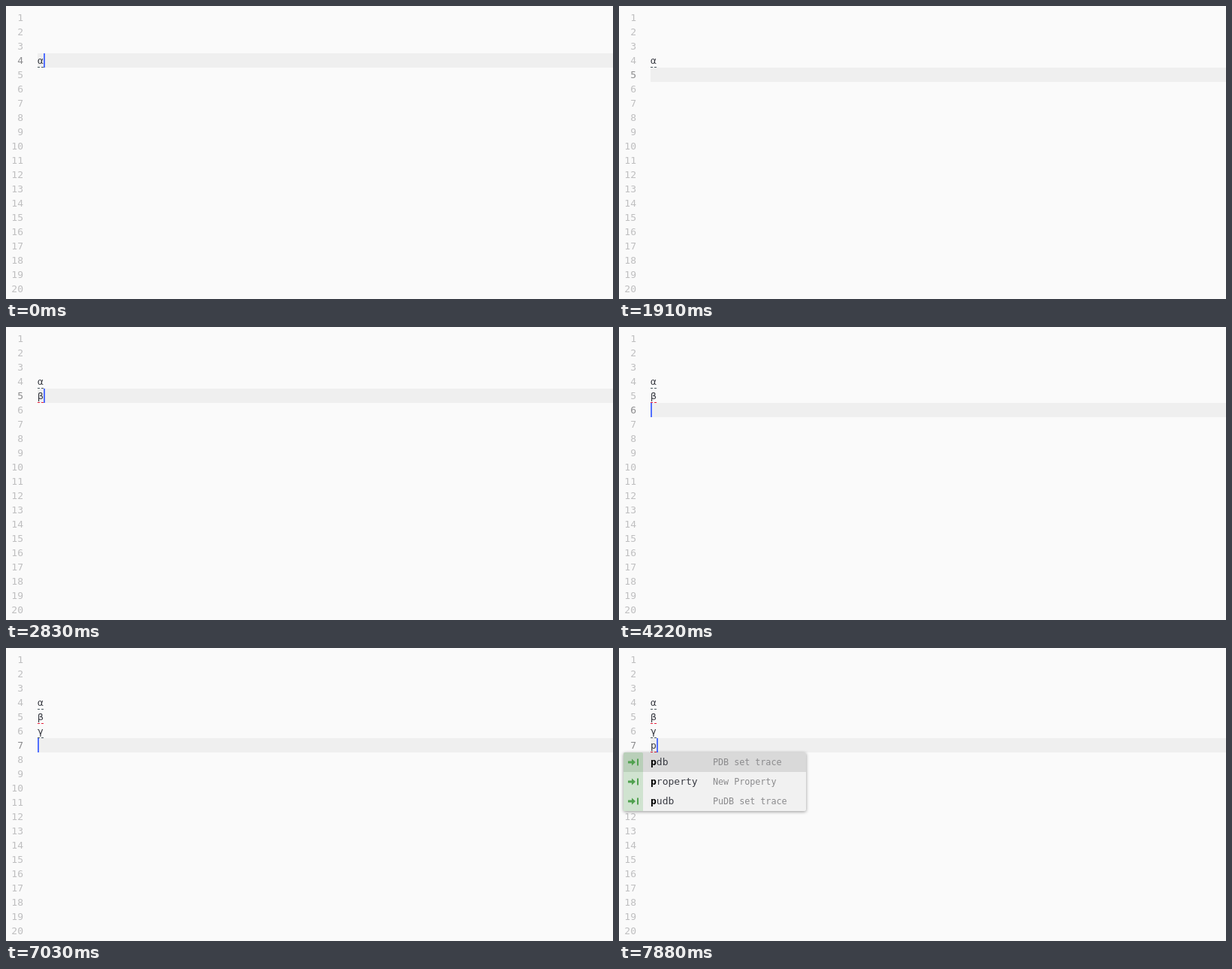
Recreate the animation shown at these times as an HTML page. Size 808 by 390 pixels, loop 8 s.

```html
<!DOCTYPE html>
<html lang="en">
<head>
<meta charset="utf-8">
<title>Greek letters in an editor</title>
<style>
  html, body { margin: 0; width: 100%; height: 100%; overflow: hidden; background: #fafafa; }
  #stage {
    position: relative; width: 808px; height: 390px; overflow: hidden; background: #fafafa;
    font: 13px/19px "DejaVu Sans Mono", monospace; color: #383a42;
  }
  #stage div, #stage span { white-space: pre; }
  .num { position: absolute; left: 0; width: 23px; text-align: right; color: #bfbfc0; }
  .num.active { color: #8c8c8e; }
  #band { position: absolute; left: 42px; right: 0; height: 19px; background: #efefef; }
  .code { position: absolute; left: 42px; height: 19px; }
  .mark {
    position: absolute; left: 42px; width: 8px; height: 1px;
    background: linear-gradient(90deg, currentColor 3px, transparent 3px 5px, currentColor 5px);
  }
  #caret { position: absolute; width: 2px; height: 19px; background: #526fff; }
  .popup {
    position: absolute; left: 6px; width: 243px; border-radius: 2px;
    background: #f1f1f1; box-shadow: 0 1px 4px rgba(0, 0, 0, .4);
  }
  .item { position: relative; height: 26px; line-height: 26px; }
  .item:first-child { background: #d9d9d9; }
  .item:first-child, .item:first-child svg { border-radius: 2px 2px 0 0; }
  .item svg { position: absolute; left: 0; top: 0; background: #d0e3d0; }
  .item:first-child svg { background: #b9cfb9; }
  .item span { position: absolute; top: 0; }
  .word { left: 36px; }
  .word b { color: #000; }
  .note { font-size: 11.7px; color: #8b8b8d; }
</style>
</head>
<body>
<div id="stage"></div>
<script>
const LOOP = 8000, LINE = 19, TOP = 6, LEFT = 42, FIRST_ROW = 4;
const MARK_COLORS = { d: '#4c5a60', r: '#e5203c' };

// time, typed text, underline per line (d dark, r red, - none), caret on, popup
const STEPS = [
  [0,    'α', 'd', 1],
  [280,  'α', 'd', 0],
  [650,  'α', 'd', 1],
  [770,  'α\n', '-', 1],
  [1050, 'α\n', '-', 0],
  [1330, 'α\n', '-', 1],
  [1480, 'α\n', 'd', 1],
  [1910, 'α\n', 'd', 0],
  [2030, 'α\nb', 'd-', 1, 'b'],
  [2280, 'α\nb', 'd-', 0, 'b'],
  [2560, 'α\nb', 'd-', 1, 'b'],
  [2680, 'α\nb', 'dr', 1, 'b'],
  [2830, 'α\nβ', 'dr', 1],
  [3080, 'α\nβ', 'dr', 0],
  [3510, 'α\nβ\n', 'd-', 1],
  [3790, 'α\nβ\n', 'd-', 0],
  [4070, 'α\nβ\n', 'd-', 1],
  [4220, 'α\nβ\n', 'dr', 1],
  [4530, 'α\nβ\n', 'dr', 0],
  [4810, 'α\nβ\ng', 'dr-', 1],
  [5090, 'α\nβ\ng', 'dr-', 0],
  [5210, 'α\nβ\ng', 'drd', 0],
  [5360, 'α\nβ\ng', 'drd', 1],
  [5640, 'α\nβ\nγ', 'drd', 1],
  [5920, 'α\nβ\nγ', 'drd', 0],
  [6230, 'α\nβ\nγ', 'drd', 1],
  [6350, 'α\nβ\nγ\n', 'dr-', 1],
  [6660, 'α\nβ\nγ\n', 'dr-', 0],
  [6910, 'α\nβ\nγ\n', 'dr-', 1],
  [7030, 'α\nβ\nγ\n', 'drd', 1],
  [7180, 'α\nβ\nγ\np', 'drd-', 1, 'p'],
  [7460, 'α\nβ\nγ\np', 'drd-', 0, 'p'],
  [7580, 'α\nβ\nγ\np', 'drdr', 0, 'p'],
  [7880, 'α\nβ\nγ\np', 'drdr', 1, 'p'],
];

const stage = document.getElementById('stage');
const rowTop = row => TOP + LINE * (row - 1);

function add(parent, className, top, text = '') {
  const el = document.createElement('div');
  el.className = className;
  el.style.top = top + 'px';
  el.textContent = text;
  return parent.appendChild(el);
}

function addPopup(row, noteLeft, items) {
  const popup = add(stage, 'popup', rowTop(row + 1));
  popup.innerHTML = items.map(([word, note]) => `<div class="item">` +
    `<svg width="26" height="26"><path fill="#50a14f" d="M6 11.5h5V8.5l5 4.5-5 4.5v-3H6zM18 8.5h2v9h-2z"/></svg>` +
    `<span class="word"><b>${word[0]}</b>${word.slice(1)}</span>` +
    `<span class="note" style="left:${noteLeft - 6}px">${note}</span></div>`).join('');
  return popup;
}

const band = add(stage, '', 0);
band.id = 'band';
const numbers = Array.from({ length: 20 }, (_, i) => add(stage, 'num', rowTop(i + 1), i + 1));
const lines = [0, 1, 2, 3].map(i => ({
  code: add(stage, 'code', rowTop(FIRST_ROW + i)),
  mark: add(stage, 'mark', rowTop(FIRST_ROW + i) + LINE - 1),
}));
const caret = add(stage, '', 0);
caret.id = 'caret';
const popups = {
  b: addPopup(5, 151, [['bug', 'bug']]),
  p: addPopup(7, 125, [
    ['pdb', 'PDB set trace'], ['property', 'New Property'], ['pudb', 'PuDB set trace'],
  ]),
};

function show([, text, marks, caretOn, popup]) {
  const typed = text.split('\n');
  const row = FIRST_ROW + typed.length - 1;
  lines.forEach(({ code, mark }, i) => {
    const color = MARK_COLORS[marks[i]];
    code.textContent = typed[i] || '';
    mark.hidden = !color;
    mark.style.color = color || '';
  });
  numbers.forEach((el, i) => el.classList.toggle('active', i + 1 === row));
  band.style.top = caret.style.top = rowTop(row) + 'px';
  caret.style.left = LEFT + 8 * typed.at(-1).length + 'px';
  caret.hidden = !caretOn;
  for (const key in popups) popups[key].hidden = key !== popup;
}

const start = performance.now();
let current;
function tick() {
  const time = (performance.now() - start) % LOOP;
  const step = STEPS.findLast(([at]) => at <= time);
  if (step !== current) show(current = step);
  requestAnimationFrame(tick);
}
tick();
</script>
</body>
</html>
```
